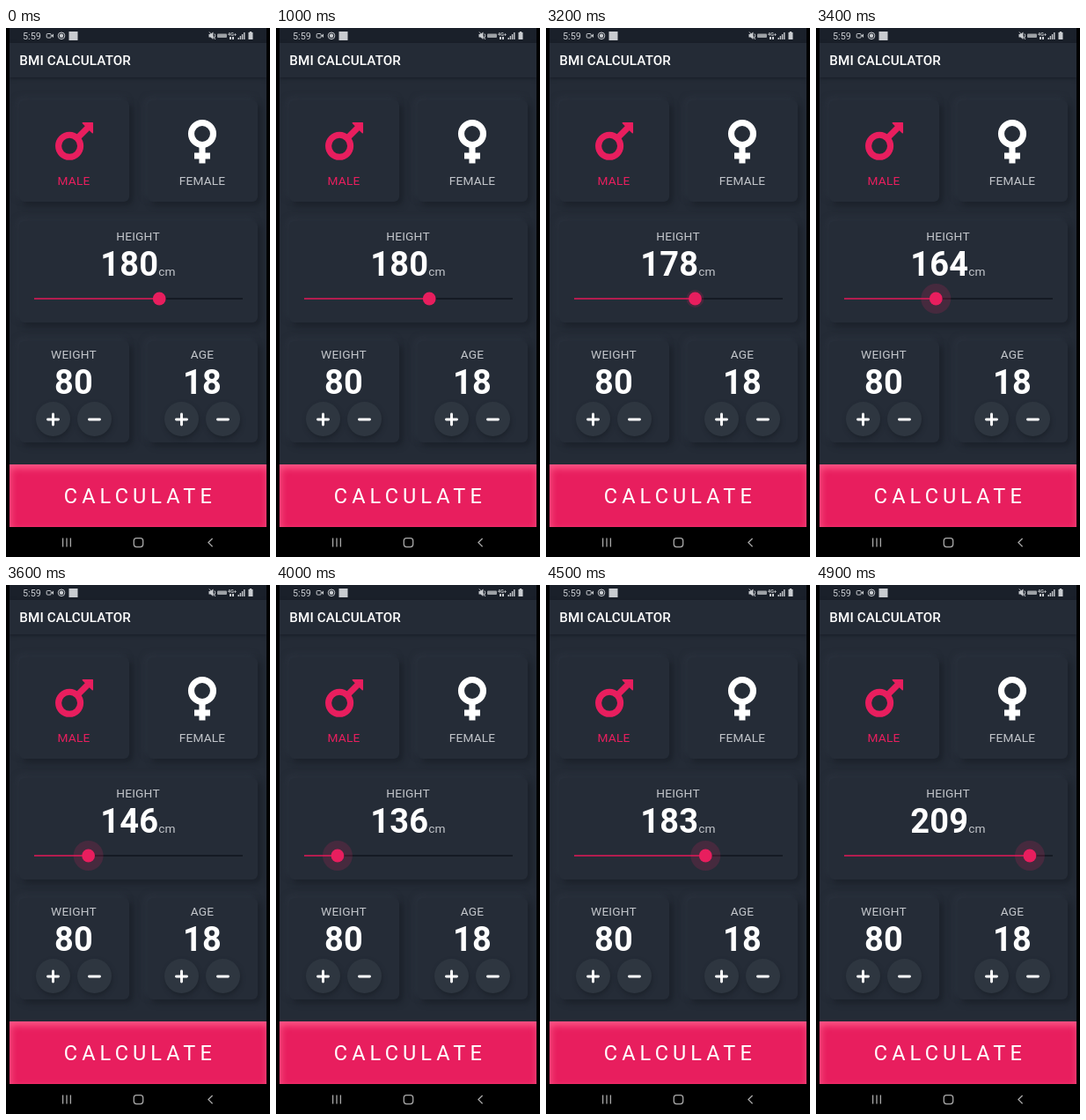
Recreate the animation shown at these times as an HTML page. Size 300x600 px, loop 5 s.

```html
<!DOCTYPE html>
<html lang="en">
<head>
<meta charset="utf-8">
<title>BMI Calculator</title>
<style>
  html, body { margin: 0; width: 100%; height: 100%; overflow: hidden; background: #000; }
  #app { position: absolute; left: 4px; top: 0; width: 292px; height: 566px; overflow: hidden; background: #242b36; }
  #app div { position: absolute; }
  .status { left: 0; top: 0; width: 292px; height: 17px; background: #1a202a; }
  .bar { left: 0; top: 17px; width: 292px; height: 39px; background: #242b36; box-shadow: 0 1px 4px #171c25; }
  .card { width: 125px; height: 115px; border-radius: 6px; background: #252c37;
    box-shadow: 4px 4px 7px #1b212a, -3px -3px 7px #2b323e; }
  .round { width: 39px; height: 39px; top: 424px; border-radius: 50%; background: #2e3640; box-shadow: 1px 3px 5px #1d232c; }
  .go { left: 0; top: 495px; width: 292px; height: 71px; background: #e81e5e; box-shadow: inset 1px 4px 9px #ff5c8a; }
  svg { position: absolute; left: 0; top: 0; font-family: Roboto, Arial, sans-serif; }
  .label { font-size: 13.7px; letter-spacing: .19px; fill: #c2c5ca; }
  .value { font-size: 38px; font-weight: 700; letter-spacing: .19px; fill: #fff; }
  .mid { text-anchor: middle; }
  .line { fill: none; stroke: currentColor; }
</style>
</head>
<body>
<div id="app">
  <div class="status"></div>
  <div class="bar"></div>
  <div class="card" style="left:11px;top:82px"></div>
  <div class="card" style="left:157px;top:82px"></div>
  <div class="card" style="left:11px;top:219px;width:271px"></div>
  <div class="card" style="left:11px;top:355px"></div>
  <div class="card" style="left:157px;top:355px"></div>
  <div class="round" style="left:30px"></div>
  <div class="round" style="left:77px"></div>
  <div class="round" style="left:176px"></div>
  <div class="round" style="left:223px"></div>
  <div class="go"></div>
</div>
<svg width="300" height="600" viewBox="0 0 300 600">
  <!-- status bar -->
  <g color="#c9ccd0" fill="#c9ccd0">
    <text x="19" y="13" font-size="10.8">5:59</text>
    <rect class="line" x="46.2" y="6.5" width="5" height="4.6" rx="1"/>
    <path d="M51.5 8.8L54 6.5v4.6z"/>
    <circle class="line" cx="63" cy="8.8" r="3.8"/>
    <circle cx="63" cy="8.8" r="2.2"/>
    <rect x="71.5" y="4" width="10" height="10"/>
    <path d="M230.5 7h2l3-2.5v8.5l-3-2.5h-2z"/>
    <path class="line" d="M231 4.5l7 8.5M237 6.5q1.5 2 0 4.5"/>
    <rect x="240" y="6.5" width="11" height="4.5" rx="1" opacity=".75"/>
    <text x="252" y="8.5" font-size="5.5" font-weight="700">4G+</text>
    <path d="M254 10h2v3h-2zM257 10h2v3h-2zM263.5 11h1.4v2h-1.4zM265.7 9h1.4v4h-1.4zM267.9 7h1.4v6h-1.4zM270.1 5h1.4v8h-1.4z"/>
    <path d="M276.8 4h2.4v1h1.3v8h-5v-8h1.3z"/>
  </g>
  <text x="15.3" y="42" font-size="15.2" font-weight="500" letter-spacing=".11" fill="#fff">BMI CALCULATOR</text>

  <!-- gender -->
  <g color="#e81e5e" stroke-width="7.1">
    <circle class="line" cx="72.1" cy="133.8" r="12.5"/>
    <path class="line" d="M80.5 125.4L94 111.9"/>
    <path d="M87.3 107.8H98.3V118.8z" fill="currentColor" stroke="currentColor" stroke-width="1.5" stroke-linejoin="round"/>
  </g>
  <g color="#fff" stroke-width="7.1">
    <circle class="line" cx="223" cy="120" r="12.5"/>
    <path class="line" d="M223 134V153.5M214 145H232"/>
  </g>
  <g class="label mid">
    <text x="77" y="177.7" style="fill:#e81e5e">MALE</text>
    <text x="223" y="177.7">FEMALE</text>
    <text x="150" y="241">HEIGHT</text>
    <text x="77" y="375">WEIGHT</text>
    <text x="223" y="375">AGE</text>
  </g>

  <!-- height -->
  <text class="mid" x="150" y="280.7"><tspan class="value" id="height">180</tspan><tspan class="label">cm</tspan></text>
  <path d="M32 307H269" stroke="#10151d" stroke-width="1.6"/>
  <path id="track" stroke="#e81e5e" stroke-width="1.6"/>
  <circle id="halo" cy="307" fill="#e81e5e" opacity=".17"/>
  <circle id="thumb" cy="307" r="7.4" fill="#e81e5e"/>

  <!-- weight and age -->
  <text class="value mid" x="77" y="414.5">80</text>
  <text class="value mid" x="223" y="414.5">18</text>
  <path d="M47.5 444h12M53.5 438v12M94.5 444h12M193.5 444h12M199.5 438v12M240.5 444h12" stroke="#fff" stroke-width="2.9" stroke-linecap="round"/>

  <text x="65.8" y="539" font-size="23.5" letter-spacing="5.1" fill="#fff">CALCULATE</text>

  <!-- navigation -->
  <g color="#a9a9a9" stroke-width="1.3">
    <path class="line" d="M64.6 578.5v10M69 578.5v10M73.4 578.5v10"/>
    <rect class="line" x="145.3" y="578.6" width="10.4" height="10" rx="3"/>
    <path class="line" d="M234.6 579l-4.6 4.6 4.6 4.6"/>
  </g>
</svg>
<script>
const LOOP = 5000, STEP = 100, DRAG = 3200;
// height shown at each step of the drag
const drag = [178, 172, 164, 155, 146, 140, 136, 134, 136, 143, 152, 162, 173, 183, 191, 198, 204, 209];
const el = id => document.getElementById(id);
const start = performance.now();

function draw(now) {
  const t = Math.max(0, now - start) % LOOP;
  const i = Math.floor((t - DRAG) / STEP);
  const height = i < 0 ? 180 : drag[i];
  const x = 32 + (height - 120) * 2.37;
  el('height').textContent = height;
  el('track').setAttribute('d', `M32 307H${x}`);
  el('thumb').setAttribute('cx', x);
  el('halo').setAttribute('cx', x);
  el('halo').setAttribute('r', i < 0 ? 0 : i ? 17 : 10);
  requestAnimationFrame(draw);
}
draw(start);
</script>
</body>
</html>
```
